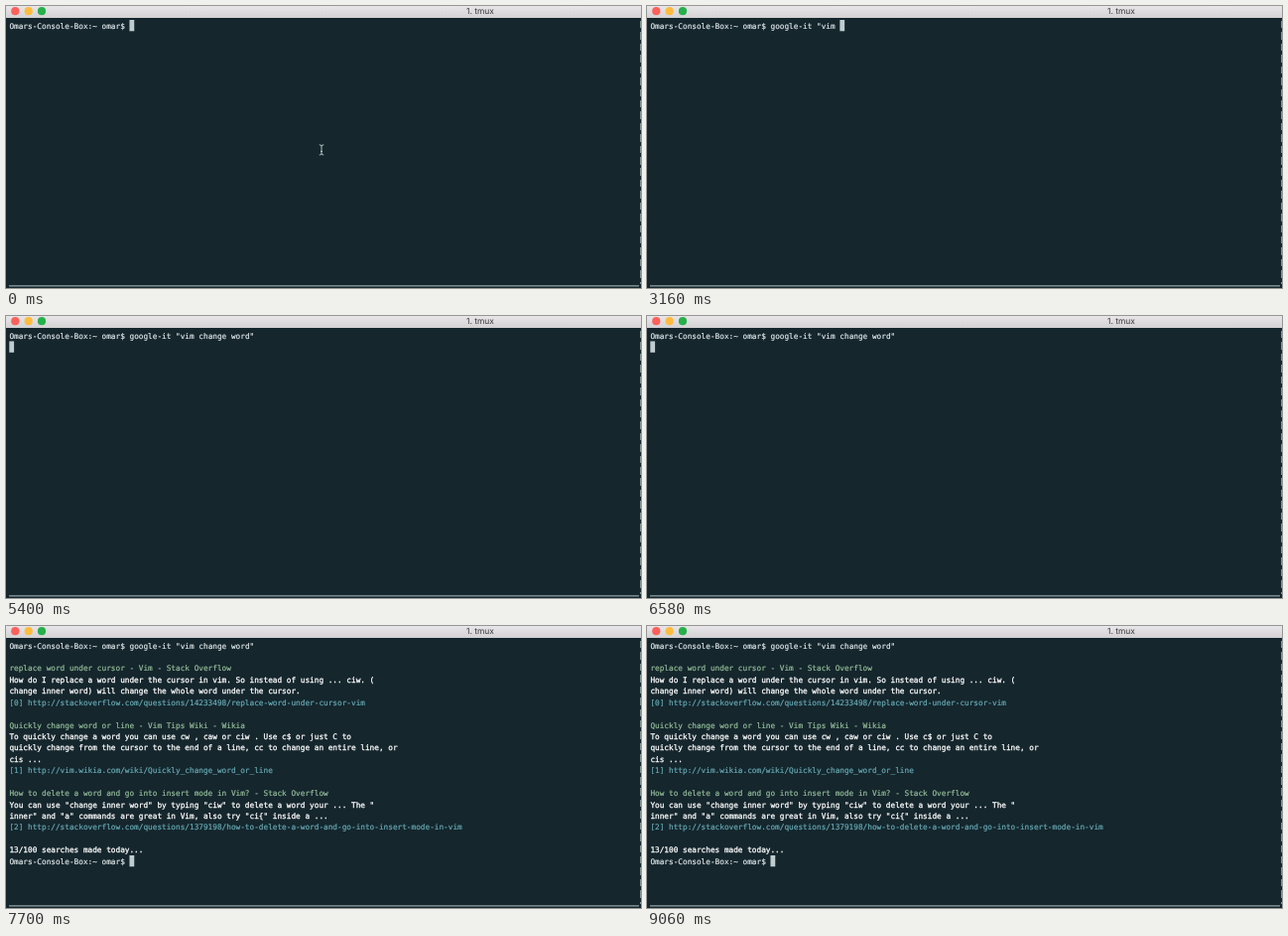
An HTML page that plays this animation: 640 by 284 pixels, repeating every 9080 ms.

```html
<!DOCTYPE html>
<html lang="en">
<head>
<meta charset="utf-8">
<title>Terminal search</title>
<style>
  html, body { margin: 0; width: 100%; height: 100%; overflow: hidden; background: #15262d; }
  #stage { position: relative; width: 640px; height: 284px; overflow: hidden; background: #15262d; }
  #bar {
    position: absolute; left: 0; top: 0; width: 640px; height: 12px;
    background: linear-gradient(#e8e6e8, #d3d1d3);
  }
  #bar b {
    position: absolute; left: 428px; width: 100px; top: 0; text-align: center;
    font: 400 8.4px/12px Inter, sans-serif; color: #353436;
    text-rendering: geometricPrecision;
  }
  #screen {
    position: absolute; left: 3.4px; top: 14.6px; margin: 0; color: #dfe7e9;
    font: 7.74px/11.42px "DejaVu Sans Mono", monospace;
    -webkit-text-stroke: .2px;
    font-variant-ligatures: none; text-rendering: geometricPrecision; white-space: pre;
  }
  #screen u { text-decoration: none; color: #94bd99; }
  #screen em { font-style: normal; color: #66a9b3; }
  #screen strong { font-weight: normal; color: #fff; -webkit-text-stroke-width: .28px; }
  #pane {
    position: absolute; right: 0; top: 15px; width: 1px; height: 265px;
    background: repeating-linear-gradient(#82928f 0 7.5px, transparent 7.5px 11.42px);
  }
  #shapes { position: absolute; left: 0; top: 0; }
</style>
</head>
<body>
<div id="stage">
  <div id="bar"><b>1. tmux</b></div>
  <svg id="shapes" width="640" height="284" fill="none">
    <circle cx="9.3" cy="5.2" r="4.1" fill="#fc605b"/>
    <circle cx="22.7" cy="5.2" r="4.1" fill="#fdbc40"/>
    <circle cx="36" cy="5.2" r="4.1" fill="#25b04b"/>
    <path d="M3 281.9H638" stroke="#93a3a7" stroke-width="1.2"/>
    <rect id="cursor" width="4.8" height="11.3" fill="#c0cdd0"/>
    <path id="mouse" transform="translate(314 139)" stroke="#c8d2d5" stroke-width=".9"
      d="M1.8 .8Q4 .8 4 2.4V9.4Q4 11 1.8 11M6.2 .8Q4 .8 4 2.4M4 9.4Q4 11 6.2 11M3 7.4H5"/>
  </svg>
  <pre id="screen">Omars-Console-Box:~ omar$ <span id="typed"></span>
<span id="results">
<u>replace word under cursor - Vim - Stack Overflow</u>
<strong>How do I replace a word under the cursor in vim. So instead of using ... ciw. (
change inner word) will change the whole word under the cursor.</strong>
<em>[0] http://stackoverflow.com/questions/14233498/replace-word-under-cursor-vim</em>

<u>Quickly change word or line - Vim Tips Wiki - Wikia</u>
<strong>To quickly change a word you can use cw , caw or ciw . Use c$ or just C to
quickly change from the cursor to the end of a line, cc to change an entire line, or
cis ...</strong>
<em>[1] http://vim.wikia.com/wiki/Quickly_change_word_or_line</em>

<u>How to delete a word and go into insert mode in Vim? - Stack Overflow</u>
<strong>You can use "change inner word" by typing "ciw" to delete a word your ... The "
inner" and "a" commands are great in Vim, also try "ci{" inside a ...</strong>
<em>[2] http://stackoverflow.com/questions/1379198/how-to-delete-a-word-and-go-into-insert-mode-in-vim</em>

<strong>13/100 searches made today...</strong>
Omars-Console-Box:~ omar$ </span></pre>
  <div id="pane"></div>
</div>
<script>
  const LOOP = 9080, ENTER = 5160, ANSWER = 6900;
  const CELL = 4.66, ROW = 11.42, PROMPT = 26;
  const command = 'google-it "vim change word"';
  // Time of each key press, in ms
  const keys = [560, 680, 860, 980, 1120, 1260, 1560, 1780, 1900, 2060, 2400, 2640, 2780, 2920,
    3080, 3300, 3440, 3580, 3700, 3840, 3980, 4120, 4260, 4400, 4560, 4700, 4860];
  const el = id => document.getElementById(id);
  const typed = el('typed'), results = el('results'), cursor = el('cursor'), mouse = el('mouse');
  const start = performance.now();

  function draw() {
    const t = Math.max(0, performance.now() - start) % LOOP;
    const count = keys.filter(k => k <= t).length;
    const done = t >= ANSWER;
    const [col, row] = done ? [PROMPT, 19] : t >= ENTER ? [0, 1] : [PROMPT + count, 0];
    typed.textContent = command.slice(0, count);
    results.style.visibility = done ? 'visible' : 'hidden';
    mouse.style.visibility = count ? 'hidden' : 'visible';
    cursor.setAttribute('x', 3.3 + col * CELL);
    cursor.setAttribute('y', 14 + row * ROW);
    requestAnimationFrame(draw);
  }
  draw();
</script>
</body>
</html>
```
